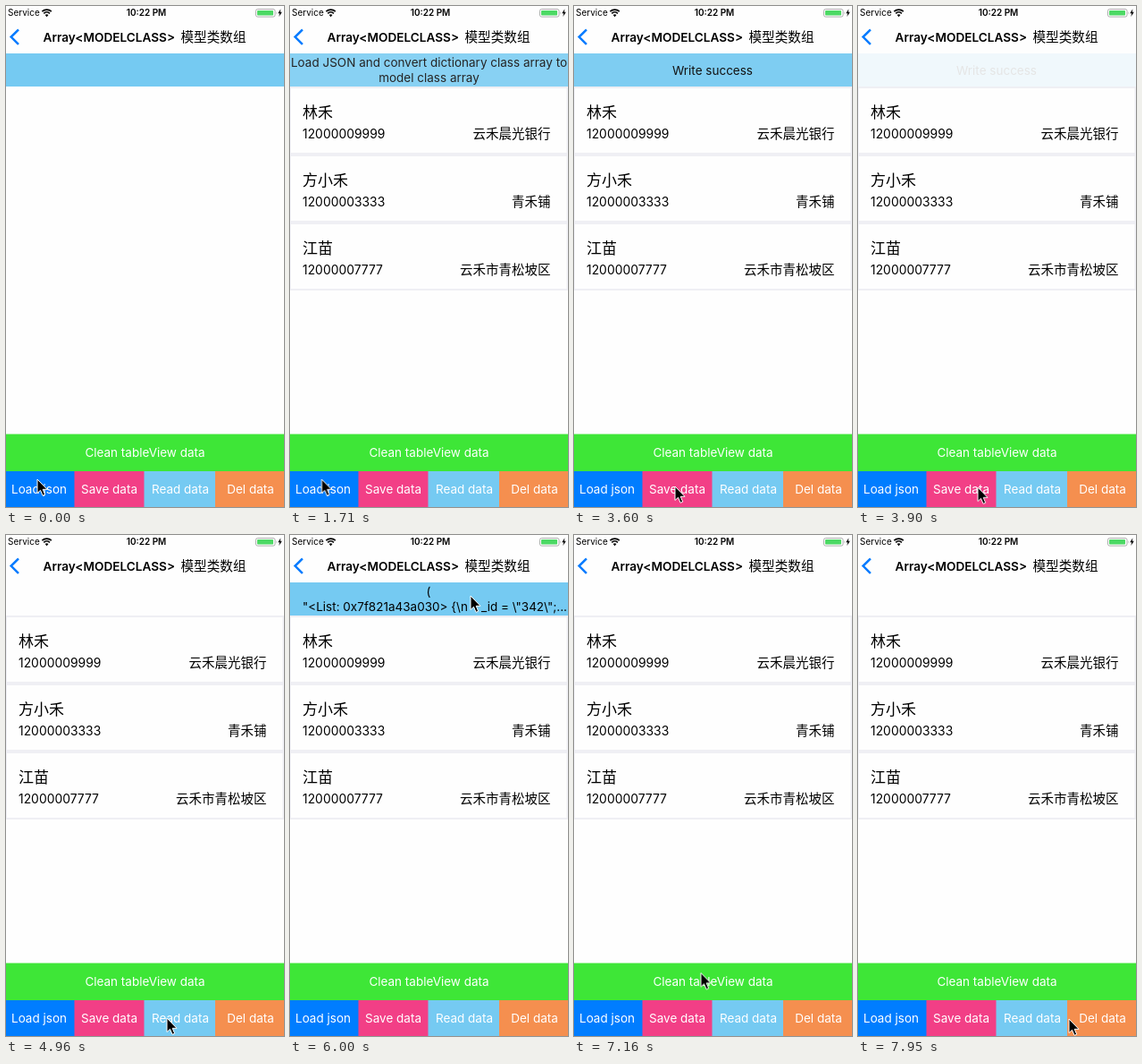
Animation, 311 px wide and 560 px high, one loop 8 s. Source, as an HTML page:

```html
<!DOCTYPE html>
<html lang="en">
<head>
<meta charset="utf-8">
<title>Model class array</title>
<style>
  html, body { margin: 0; width: 100%; height: 100%; overflow: hidden; background: #fefefe; }
  svg { display: block; width: 311px; height: 560px; }
  text {
    font: 13.5px Inter, 'Noto Sans CJK SC', 'Noto Sans CJK', sans-serif;
    white-space: pre;
  }
  .mid { text-anchor: middle; }
  .status { font-size: 10px; }
  .bold { font-weight: 600; }
  .title { font-size: 13.6px; }
  .han { font-size: 14.6px; font-weight: 500; }
  .name { font-size: 17px; font-weight: 500; }
  .phone { font-size: 13.9px; }
  .place { font-size: 14.5px; text-anchor: end; }
  .buttons text { fill: #fff; }
  .bar { fill: #75caf2; }

  .rows, .empty, .loaded, .written, .read, .cursor { animation: 8s linear infinite; }
  .rows { animation-name: rows; }
  .empty { animation-name: empty; }
  .loaded { animation-name: loaded; }
  .written { animation-name: written; }
  .read { animation-name: read; }
  .cursor { animation-name: cursor; }

  @keyframes rows {
    0%, 7.499% { opacity: 0; }
    7.5%, 100% { opacity: 1; }
  }
  @keyframes empty {
    0%, 7.499% { opacity: 1; }
    7.5%, 100% { opacity: 0; }
  }
  @keyframes loaded {
    0%, 7.499% { opacity: 0; }
    7.5% { opacity: 1; }
    19.75% { opacity: 1; animation-timing-function: ease-in-out; }
    26%, 100% { opacity: 0; }
  }
  @keyframes written {
    0%, 30.749% { opacity: 0; }
    30.75% { opacity: 1; }
    43.875% { opacity: 1; animation-timing-function: ease-in-out; }
    50.125%, 100% { opacity: 0; }
  }
  @keyframes read {
    0%, 64.874% { opacity: 0; }
    64.875% { opacity: 1; }
    77.5% { opacity: 1; animation-timing-function: ease-in-out; }
    83.75%, 100% { opacity: 0; }
  }
  @keyframes cursor {
    0% { transform: translate(35px, 529px); }
    21.1% { transform: translate(35px, 529px); animation-timing-function: ease-in; }
    24.125% { transform: translate(59.5px, 532.5px); animation-timing-function: ease-out; }
    27% { transform: translate(113px, 537px); }
    45% { transform: translate(113px, 537px); animation-timing-function: ease-in-out; }
    53.9% { transform: translate(170px, 540px); }
    55.1% { transform: translate(170px, 540px); animation-timing-function: ease-out; }
    62% { transform: translate(180px, 540px); }
    66.8% { transform: translate(180px, 540px); animation-timing-function: ease-in-out; }
    75% { transform: translate(202px, 68px); }
    77.5% { transform: translate(202px, 66px); animation-timing-function: ease-in-out; }
    81.375% { transform: translate(162px, 481.5px); animation-timing-function: ease-out; }
    87.2% { transform: translate(148px, 498px); }
    91% { transform: translate(138px, 484px); }
    93% { transform: translate(148px, 470px); animation-timing-function: ease-in-out; }
    98% { transform: translate(207px, 540px); }
    99.375%, 100% { transform: translate(236px, 541px); }
  }
</style>
</head>
<body>
<svg viewBox="0 0 311 560">
  <rect width="311" height="560" fill="#fefefe"/>

  <!-- Status bar -->
  <text class="status" x="2" y="11">Service</text>
  <path d="M40.4 6.2a7.4 7.4 0 0 1 10.4 0M42.3 8.3a4.7 4.7 0 0 1 6.6 0" fill="none" stroke="#000" stroke-width="1.7"/>
  <path d="M45.6 12.2l-1.9-2.1a2.7 2.7 0 0 1 3.8 0z"/>
  <text class="status bold mid" x="157" y="11">10:22 PM</text>
  <rect x="279.5" y="3.5" width="21.5" height="8.6" rx="2" fill="none" stroke="#a6a6a6" stroke-width=".9"/>
  <rect x="281" y="5" width="18" height="5.6" rx=".8" fill="#4cd964"/>
  <path d="M302 6.2q1.3 1.6 0 3.2z" fill="#a6a6a6"/>
  <path d="M307.4 3.2l-3.2 5h2l-.9 3.8 3.5-5.2h-2.1z"/>

  <!-- Navigation bar -->
  <path d="M14 26.3L5.7 34.6l8.3 8.3" fill="none" stroke="#007aff" stroke-width="2.5"/>
  <text class="title bold" x="41.5" y="39.5">Array&lt;MODELCLASS&gt;</text>
  <text class="han" x="195.5" y="39.5">模型类数组</text>

  <!-- Message label -->
  <rect class="bar empty" y="53" width="311" height="37"/>
  <g class="loaded">
    <rect class="bar" y="53" width="311" height="37"/>
    <text class="mid" x="155.5" y="68">Load JSON and convert dictionary class array to</text>
    <text class="mid" x="155.5" y="85">model class array</text>
  </g>
  <g class="written">
    <rect class="bar" y="53" width="311" height="37"/>
    <text class="mid" x="155" y="76.5">Write success</text>
  </g>
  <g class="read">
    <rect class="bar" y="53" width="311" height="37"/>
    <text class="mid" x="155" y="68">(</text>
    <text x="14" y="85">"&lt;List: 0x7f821a43a030&gt; {\n    _id = \"342\";...</text>
  </g>

  <!-- Table -->
  <g class="rows">
    <rect y="90" width="311" height="228" fill="#efeff4"/>
    <g>
      <rect x="1" y="92" width="308.5" height="72" fill="#fefefe"/>
      <text class="name" x="14" y="125">林禾</text>
      <text class="phone" x="14" y="148">12000009999</text>
      <text class="place" x="291.5" y="148">云禾晨光银行</text>
    </g>
    <g transform="translate(0 76)">
      <rect x="1" y="92" width="308.5" height="72" fill="#fefefe"/>
      <text class="name" x="14" y="125">方小禾</text>
      <text class="phone" x="14" y="148">12000003333</text>
      <text class="place" x="291.5" y="148">青禾铺</text>
    </g>
    <g transform="translate(0 152)">
      <rect x="1" y="92" width="308.5" height="72" fill="#fefefe"/>
      <text class="name" x="14" y="125">江苗</text>
      <text class="phone" x="14" y="148">12000007777</text>
      <text class="place" x="291.5" y="148">云禾市青松坡区</text>
    </g>
  </g>

  <!-- Buttons, each laid over the end of the one before -->
  <g class="buttons mid">
    <rect y="478.5" width="311" height="42" fill="#3ee637"/>
    <rect y="520" width="311" height="40" fill="#007dff"/>
    <rect x="76.5" y="520" width="234.5" height="40" fill="#f23f86"/>
    <rect x="154.5" y="520" width="156.5" height="40" fill="#75caf2"/>
    <rect x="234" y="520" width="77" height="40" fill="#f58f4f"/>
    <text x="155.5" y="504">Clean tableView data</text>
    <text x="37" y="545">Load json</text>
    <text x="115.5" y="545">Save data</text>
    <text x="195" y="545">Read data</text>
    <text x="273.5" y="545">Del data</text>
  </g>

  <path class="cursor" d="M0 0V15.5l3.5-3.2 2.6 6 2.6-1.1-2.5-5.9h4.8z" stroke="#fff" stroke-width="1"/>
</svg>
</body>
</html>
```
